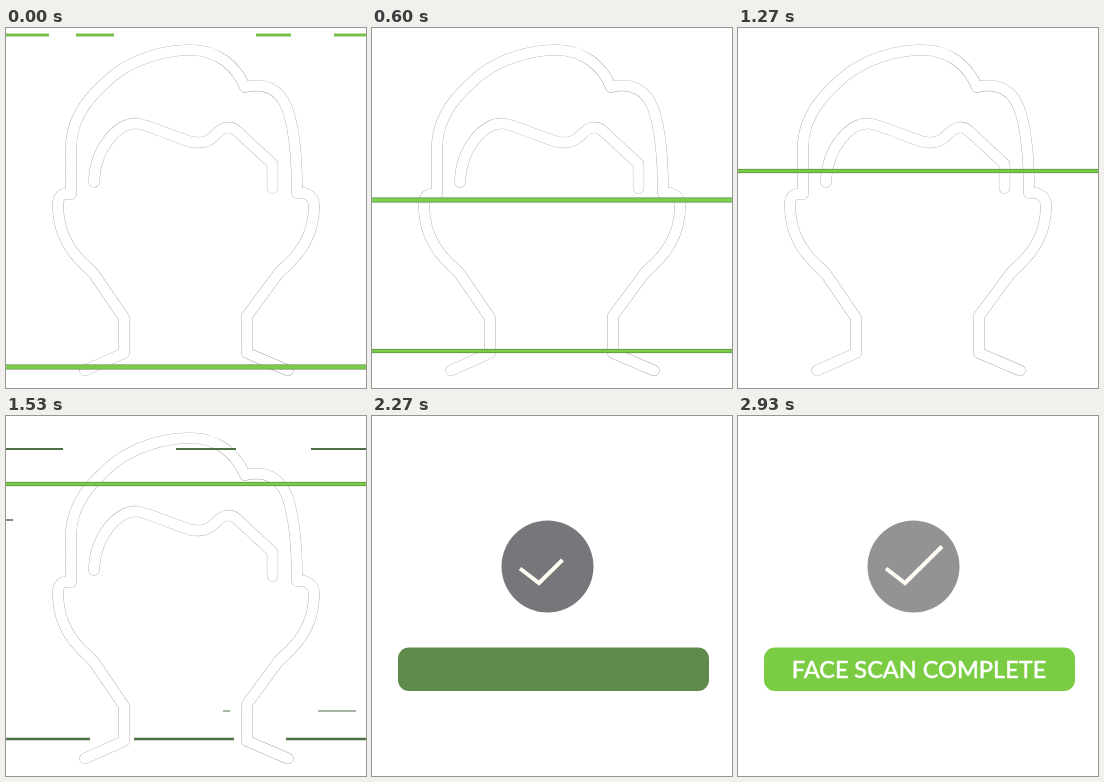
An HTML page for the animation above (3340 ms loop, 360 by 360 pixels).

```html
<!DOCTYPE html>
<html lang="en">
<head>
<meta charset="utf-8">
<title>Face scan</title>
<style>
  html, body { margin: 0; width: 100%; height: 100%; overflow: hidden; background: #fff; }
  svg { display: block; width: 100vw; height: 100vh; }
  path { fill: none; }
  .face { stroke-linecap: round; stroke-linejoin: round; }
  text { font: 500 23.5px Lato, "Open Sans", sans-serif; text-anchor: middle; stroke-width: .4; }
</style>
</head>
<body>
<svg viewBox="0 0 360 360">
  <defs>
    <path id="head" d="M79 342.500L118 325V290L88 246C83 240 78 237 73 231C58 215 52 198 52 177Q52 166 60 166H65V120C65 86 88 64 108 47C130 30 160 22 184 22C212 22 230 38 239 59C260 54 274 62 281 80C288 99 291 125 291 165H298Q308 168 308 178C308 198 302 215 287 231C282 237 277 240 272 246L241 288V325L282 342.500
      M88 154C89 120 112 94 131 95.500C140 96 176 112 186 114C209 118 209 100 222 99.500Q227 99 232 104L266.500 136V160"/>
  </defs>
  <g id="face" class="face">
    <use href="#head" id="edge" stroke-width="11.200"/>
    <use href="#head" id="fill" stroke-width="10.500"/>
  </g>
  <g id="lines"></g>
  <g id="done">
    <circle id="disc" cx="175.500" cy="150.500" r="46"/>
    <path id="tick" d="M148 152.500L167 167L204 130.500" stroke="#fffdf3" stroke-width="4" pathLength="1"/>
    <rect id="button" x="26" y="231.500" width="311" height="43.500" rx="11"/>
    <text id="label" x="181" y="261.500">FACE SCAN COMPLETE</text>
  </g>
</svg>
<script>
const LOOP = 3340, STEP = 1000 / 15, LAST = 44;
const el = id => document.getElementById(id);
const clamp = (v, lo = 0, hi = 1) => Math.min(hi, Math.max(lo, v));
const mix = (a, b, k) => `rgb(${a.map((v, i) => Math.round(v + (b[i] - v) * k))})`;
const show = (id, on) => el(id).setAttribute("visibility", on ? "visible" : "hidden");

// Piecewise linear paths of the two beams: [step, y]
const down = [[0, 7], [9, 172], [15, 278], [18.5, 339]];
const up = [[0, 339], [8.1, 339], [9, 323], [15, 218], [23, 68], [25, 33]];

// Faint broken lines: y, first step, last step, height, [start, end] pairs
const traces = [
  [33, 22, 24, 2, [0, 57, 170, 230, 305, 360]],
  [295, 22, 24, 1, [217, 224, 312, 350]],
  [104, 22, 24, 1.5, [0, 7]],
  [323, 20, 24, 2.5, [0, 84, 128, 228, 280, 360]],
  [334, 25, 28, 2, [0, 68, 137, 227, 290, 350]],
  [33, 26, 28, 3, [0, 107, 145, 360]]
];

function along(points, s) {
  const n = points.findIndex(p => p[0] >= s);
  if (n < 0) return points[points.length - 1][1];
  if (n === 0) return points[0][1];
  const [a, y0] = points[n - 1], [b, y1] = points[n];
  return y0 + (y1 - y0) * (s - a) / (b - a);
}

const bar = (x, y, w, h, color) =>
  `<rect x="${x}" y="${y - h / 2}" width="${w}" height="${h}" fill="${color}"/>`;
const beam = (y, h) => bar(0, y, 360, h, "#527c3b") + bar(0, y, 360, h - 1.2, "#7acc4a");

function dashes(y, h, ends, color) {
  let out = "";
  for (let i = 0; i < ends.length; i += 2) out += bar(ends[i], y, ends[i + 1] - ends[i], h, color);
  return out;
}

function drawLines(s) {
  let out = "";
  if (s === 0) out += dashes(7, 3, [0, 43, 70, 108, 250, 285, 328, 360], "#78c04a");
  else if (s < 19) out += beam(along(down, s), 5);
  if (s < 26) out += beam(along(up, s), s < 9 ? 5 : 4.2);
  for (const [y, from, to, h, ends] of traces)
    if (s >= from && s <= to) out += dashes(y, h, ends, "#4d6f46");
  el("lines").innerHTML = out;
}

function drawFace(s) {
  show("face", s < 28);
  const fade = clamp((s - 24) / 3);
  el("edge").setAttribute("stroke", mix([160, 160, 160], [119, 119, 123], fade));
  el("fill").setAttribute("stroke", mix([255, 255, 255], [119, 119, 123], fade));
}

function drawDone(s) {
  show("done", s >= 32);
  show("label", s >= 37);
  const k = clamp((s - 34) / 6, -.4, 1);
  el("disc").setAttribute("fill", mix([119, 119, 123], [147, 147, 150], k));
  el("button").setAttribute("fill", mix([95, 138, 75], [122, 204, 67], k));
  const white = mix([150, 170, 140], [255, 255, 255], clamp((s - 36) / 5));
  el("label").setAttribute("fill", white);
  el("label").setAttribute("stroke", white);
  const left = 1 - clamp((s - 31) / 6);
  el("tick").setAttribute("stroke-dasharray", `${1 - left * left} 2`);
}

function draw() {
  const t = performance.now() % LOOP;
  const s = Math.min(LAST, Math.floor((t + 4) / STEP));
  drawFace(s);
  drawLines(s);
  drawDone(s);
  requestAnimationFrame(draw);
}
draw();
</script>
</body>
</html>
```
